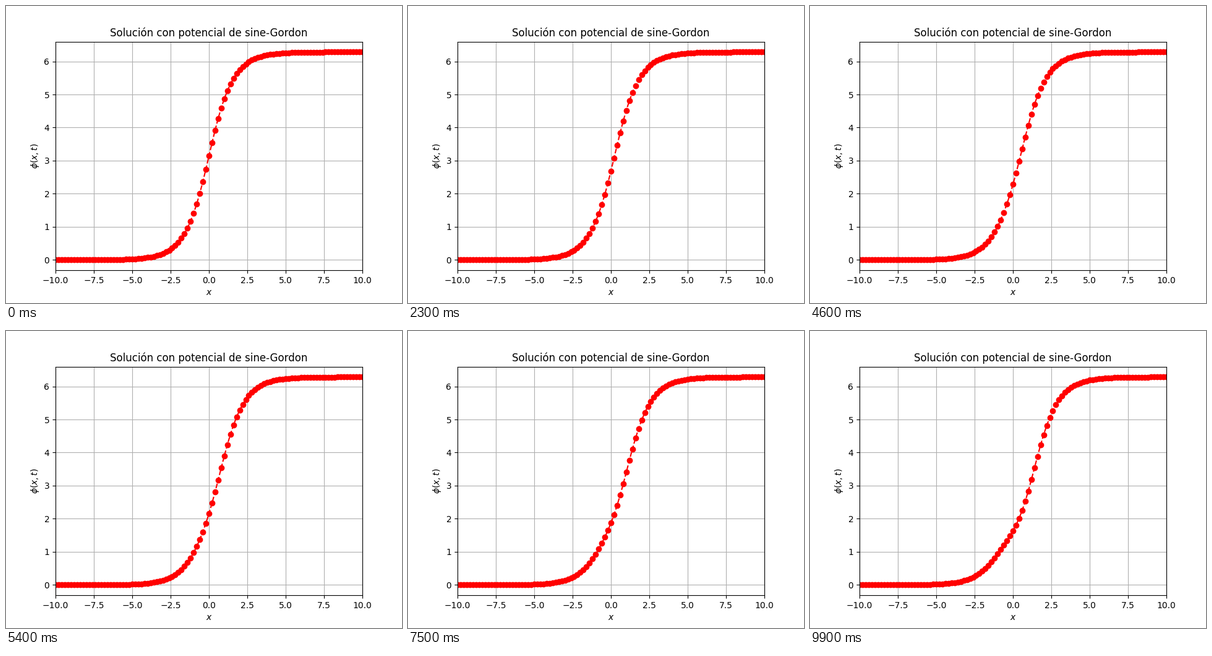
Recreate the animation shown at these times as a matplotlib script. Size 640 by 480 pixels, loop 10000 ms.

```python
import numpy as np
import matplotlib.pyplot as plt
from matplotlib.animation import FuncAnimation

FRAMES = 100
INTERVAL = 100
DX, DT = 0.2, 0.01

plt.rcParams["font.family"] = "DejaVu Sans"

x = np.linspace(-10, 10, 101)


def accel(phi):
    """phi_xx + sin(phi), with fixed ends."""
    a = np.zeros_like(phi)
    a[1:-1] = (phi[2:] - 2 * phi[1:-1] + phi[:-2]) / DX**2 + np.sin(phi[1:-1])
    return a


def solve():
    """Leapfrog evolution of a kink launched to the right at unit speed."""
    kink = 4 * np.arctan(np.exp(x))
    speed = -2 / np.cosh(x)
    steps = [kink, kink + DT * speed + DT**2 / 2 * accel(kink)]
    while len(steps) < FRAMES:
        steps.append(2 * steps[-1] - steps[-2] + DT**2 * accel(steps[-1]))
    return steps


phi = solve()

fig, ax = plt.subplots(figsize=(6.4, 4.8), dpi=100)
line, = ax.plot(x, phi[0], "ro--")
ax.set_xlim(-10, 10)
ax.set_title("Solución con potencial de sine-Gordon")
ax.set_xlabel(r"$x$")
ax.set_ylabel(r"$\phi(x,t)$")
ax.grid(True)


def update(i):
    line.set_ydata(phi[i])
    return line,


anim = FuncAnimation(fig, update, frames=FRAMES, interval=INTERVAL, repeat=True)
plt.show()
```
